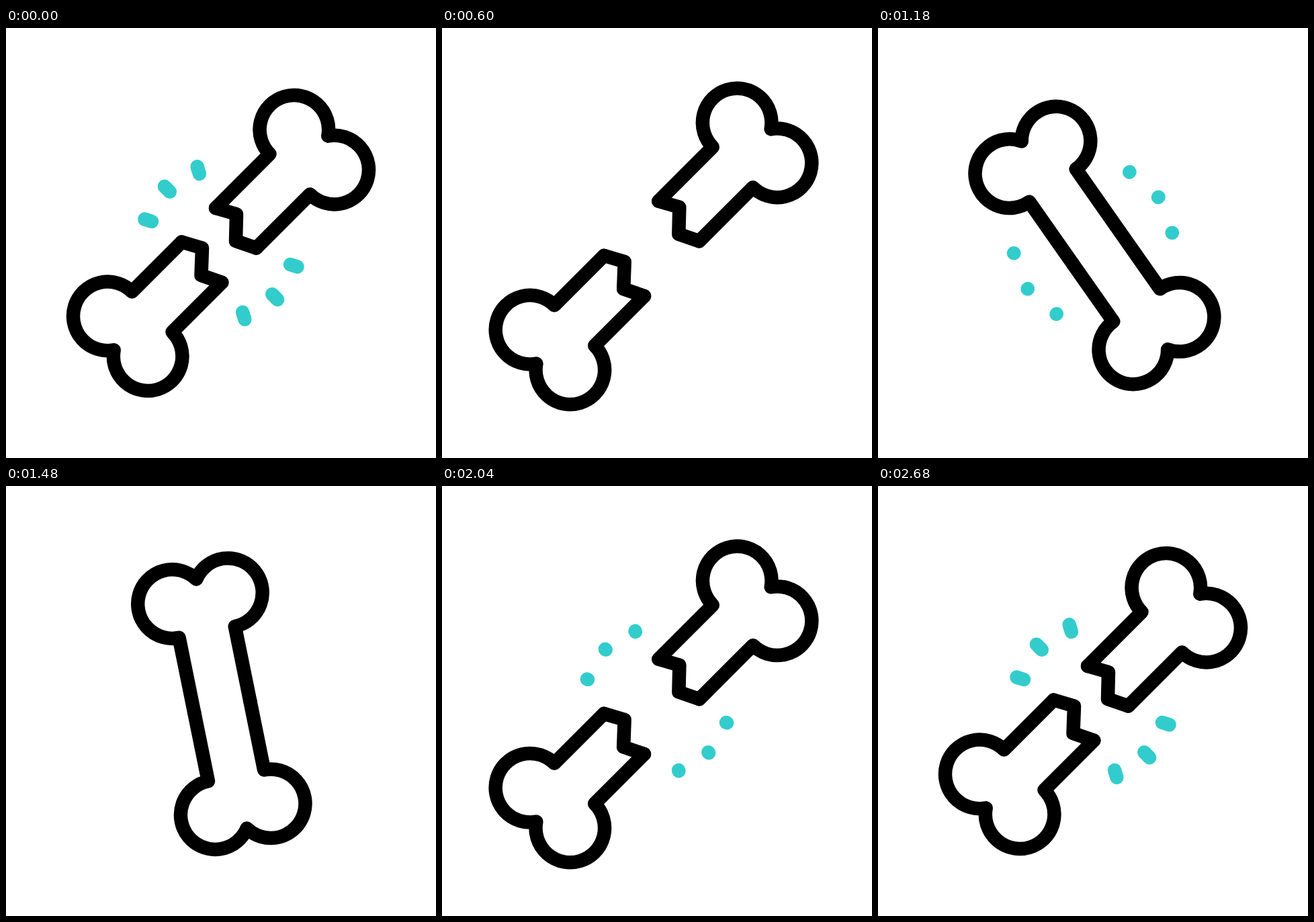
An HTML page for the animation above (2990 ms loop, 640 by 640 pixels).

```html
<!DOCTYPE html>
<html lang="en">
<head>
<meta charset="utf-8">
<title>Broken bone</title>
<style>
  html, body { margin: 0; height: 100%; overflow: hidden; background: #fff; }
  svg { display: block; width: 100%; height: 100%; }
  path, line { fill: none; stroke-linecap: round; stroke-linejoin: round; }
  path { stroke: #000; stroke-width: 20.5; }
  line { stroke: #3cc; stroke-width: 20.5; }
</style>
</head>
<body>
<svg viewBox="0 0 640 640">
  <g id="bone">
    <g id="upper">
      <path d="M312 268L392.5 187.5A51.3 51.3 0 1 1 479.3 160.7A51.3 51.3 0 1 1 452.5 247.5L372.5 327.5"/>
      <path class="crack" d="M312 268L343 277L342 317L372.5 327.5"/>
    </g>
    <g id="lower">
      <path d="M321.3 378.7L247.5 452.5A51.3 51.3 0 1 1 160.7 479.3A51.3 51.3 0 1 1 187.5 392.5L261.5 318.5"/>
      <path class="crack" d="M261.5 318.5L292 327.5L290.5 368L321.3 378.7"/>
    </g>
    <g id="marks" transform="translate(320 320)"></g>
  </g>
</svg>
<script>
const LOOP = 2990, CLOSED = -28.5, INNER = 107.8, OUTER = 119;
const $ = id => document.getElementById(id);

// Keys are [ms, value]
const turn = [[0, 0], [762, 0], [1200, -80.5], [1976, 0]];
const upperShift = [[0, 0], [545, 12.5], [945, CLOSED], [1735, CLOSED], [2090, 12.5], [2680, 0]];
const lowerShift = [[0, 0], [545, -22.7], [945, 22.5], [1735, 22.5], [2090, -22.7], [2680, 0]];
// 0 to 1 grows a mark outwards, 1 to 2 shrinks it towards its outer end
const trim = [[0, 1], [300, 2], [300, 0], [805, 0], [1000, 1], [1205, 2], [1205, 0], [1985, 0], [2250, 1]];

function valueAt(keys, t) {
  const next = keys.findIndex(key => key[0] > t);
  if (next < 0) return keys[keys.length - 1][1];
  const [t0, v0] = keys[next - 1], [t1, v1] = keys[next];
  const x = (t - t0) / (t1 - t0);
  return v0 + (v1 - v0) * x * x * (3 - 2 * x);
}

const marks = [17.3, 45, 72.7, 197.3, 225, 252.7].map(angle => {
  const line = document.createElementNS("http://www.w3.org/2000/svg", "line");
  line.setAttribute("transform", `rotate(${angle})`);
  $("marks").append(line);
  return line;
});
const cracks = document.querySelectorAll(".crack");

function slide(id, d) {
  $(id).setAttribute("transform", `translate(${d} ${-d})`);
}

function draw(now) {
  const t = now % LOOP;
  const up = valueAt(upperShift, t), grow = valueAt(trim, t);
  const radius = f => INNER + (OUTER - INNER) * f;

  $("bone").setAttribute("transform", `rotate(${valueAt(turn, t)} 320 320)`);
  slide("upper", up);
  slide("lower", valueAt(lowerShift, t));
  cracks.forEach(crack => crack.style.display = up > CLOSED ? "" : "none");

  $("marks").style.display = grow > 0 && grow < 2 ? "" : "none";
  marks.forEach(line => {
    line.setAttribute("x1", radius(Math.max(grow - 1, 0)));
    line.setAttribute("x2", radius(Math.min(grow, 1)));
  });
}

const start = performance.now();
function tick() {
  draw(performance.now() - start);
  requestAnimationFrame(tick);
}
tick();
</script>
</body>
</html>
```
